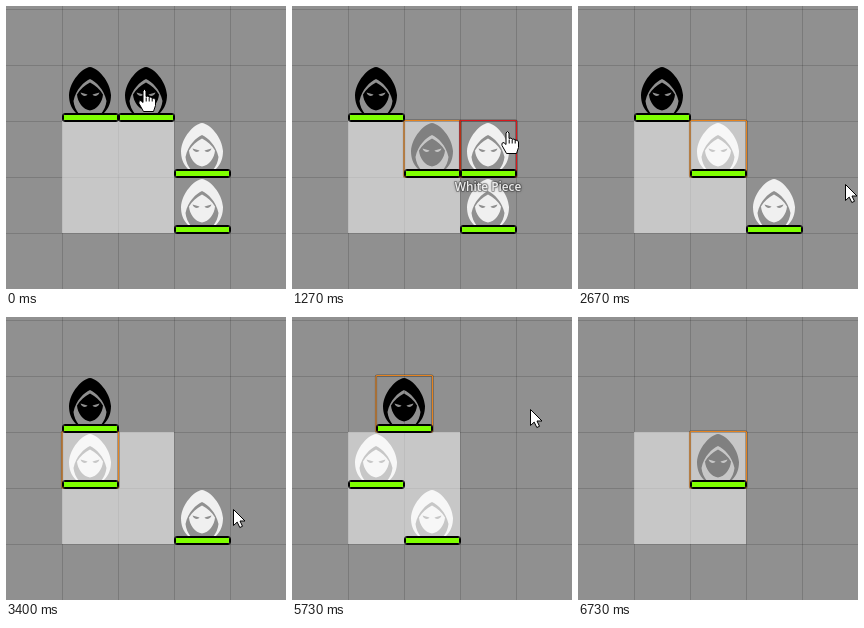
Animation of 280x283 px, one loop 7540 ms. Source, as an HTML page with a canvas:

```html
<!DOCTYPE html>
<html lang="en">
<head>
<meta charset="utf-8">
<title>Board pieces</title>
<style>
  html, body { margin: 0; width: 100%; height: 100%; overflow: hidden; background: #909090; }
  canvas { display: block; }
</style>
</head>
<body>
<canvas id="stage" width="280" height="283"></canvas>
<script>
const ctx = document.getElementById('stage').getContext('2d');
const LOOP = 7540, TICKS_PER_MS = 15 / 1000;
const CELL = 56, TOP = 3;
const SLIDE = 4;   // ticks a piece needs for one cell
const TRAVEL = 5;  // ticks the pointer needs to or from a piece

const hood = new Path2D(
  'M28 2C20 3 8 16 7 30C7 37 9 43 14 48H42C47 43 49 37 49 30C48 16 36 3 28 2Z' +
  'M28 14C22 17 14 24 11.5 36C12 41 14 45 17 49H39C42 45 44 41 44.5 36C42 24 34 17 28 14Z');
const face = new Path2D(
  'M28 17.5C23 20 18 24 15 29.5C15.5 37 21 44.5 28 45.5C35 44.5 40.5 37 41 29.5C38 24 33 20 28 17.5Z' +
  'M18.5 27.5L25.5 29.5C24.5 31.8 19.5 31.5 18.5 27.5ZM37.5 27.5L30.5 29.5C31.5 31.8 36.5 31.5 37.5 27.5Z');
const arrow = new Path2D('M0 0V16L3.7 12.6L6.3 18L9 16.8L6.5 11.5H11.5Z');
const hand = new Path2D(
  'M-1.5 1.5Q0 -1.5 1.5 1.5V7Q4 5.5 4.8 7.8Q7 6.7 7.8 8.7Q10.5 8 11 10.5V16' +
  'L9 22H-1L-5.5 14Q-6 10.5 -3.5 11.2L-1.5 13Z');

// Each turn: the pointer reaches a piece, clicks it, leaves, and the piece takes its steps.
const turns = [
  { color: 'Black', col: 2, row: 1, hover: 1, click: 4, leave: 8, grip: [138, 83], away: [258, 40],
    steps: [{ at: 8, dy: 1 }], lost: 33 },
  { color: 'White', col: 3, row: 2, hover: 19, click: 25, leave: 27, grip: [215, 125], away: [267, 178],
    steps: [{ at: 27, dx: -1 }, { at: 46, dx: -1 }], lost: 98 },
  { color: 'White', col: 3, row: 3, hover: 53, click: 58, leave: 60, grip: [205, 200], away: [275, 129],
    steps: [{ at: 60, dx: -1 }], lost: 98 },
  { color: 'Black', col: 1, row: 1, hover: 75, click: 81, leave: 82, grip: [88, 84], away: [255, 93],
    steps: [{ at: 84, dx: 1 }, { at: 92, dy: 1 }], lost: Infinity }
];
const exit = { hover: 97, click: Infinity, leave: Infinity, grip: [240, 290] };
const nextOf = i => turns[i + 1] || exit;

const ramp = (t, a, b) => Math.min(1, Math.max(0, (t - a) / (b - a)));
const smooth = u => u * u * (3 - 2 * u);
const glide = ([x0, y0], [x1, y1], u) => [x0 + (x1 - x0) * smooth(u), y0 + (y1 - y0) * smooth(u)];

function pieceAt(turn, i, t) {
  let { col, row } = turn;
  for (const { at, dx = 0, dy = 0 } of turn.steps) {
    const u = ramp(t, at, at + SLIDE);
    col += dx * u;
    row += dy * u;
  }
  return {
    x: col * CELL, y: TOP + row * CELL,
    name: turn.color + ' Piece',
    fill: turn.color === 'White' ? '#f0f0f0' : '#000',
    hovered: t >= turn.hover && t < Math.min(turn.leave, turn.steps[0].at),
    selected: t >= turn.click && t < nextOf(i).click
  };
}

function pointerAt(t) {
  const i = turns.findLastIndex((_, k) => k === 0 || t >= turns[k].hover);
  const { grip, away, leave } = turns[i], next = nextOf(i);
  const back = next.hover - TRAVEL;
  return t < back
    ? glide(grip, away, ramp(t, leave, leave + TRAVEL))
    : glide(away, next.grip, ramp(t, back, next.hover));
}

function at(x, y, draw) {
  ctx.save();
  ctx.translate(x, y);
  draw();
  ctx.restore();
}

function drawIcon(p) {
  at(p.x, p.y, () => {
    ctx.fillStyle = p.fill;
    ctx.fill(hood, 'evenodd');
    ctx.fill(face, 'evenodd');
  });
}

function line(color, width, trace) {
  ctx.beginPath();
  trace();
  ctx.strokeStyle = color;
  ctx.lineWidth = width;
  ctx.stroke();
}

function drawBorder(p) {
  if (!p.selected && !p.hovered) return;
  const outline = () => ctx.roundRect(p.x, p.y - 0.5, 56.5, 56.5, 1);
  line('rgba(0,0,0,.4)', 2.2, outline);
  line(p.selected ? '#e58420' : '#d8181c', 1.1, outline);
}

function drawBar(p) {
  const x = p.x + 0.5, y = p.y + 48.5;
  line('#000', 1, () => ctx.roundRect(x, y, 56, 8, 2.5));
  line('#000', 1, () => ctx.roundRect(x + 1, y + 1, 54, 6, 1.5));
  ctx.fillStyle = '#7fff00';
  ctx.fillRect(x + 1.5, y + 1.5, 53, 5);
}

function drawLabel(p) {
  const x = p.x + 28, y = p.y + 70;
  ctx.save();
  ctx.font = '600 11.8px "Open Sans", sans-serif';
  ctx.textAlign = 'center';
  ctx.lineJoin = 'round';
  ctx.lineWidth = 2;
  ctx.strokeStyle = 'rgba(60,60,60,.4)';
  ctx.strokeText(p.name, x, y);
  ctx.shadowColor = 'rgba(0,0,0,.6)';
  ctx.shadowBlur = 3;
  ctx.fillStyle = '#ececec';
  ctx.fillText(p.name, x, y);
  ctx.restore();
}

function drawPointer(t, isHand) {
  const [x, y] = pointerAt(t).map(Math.round);
  at(x + 0.5, y + 0.5, () => {
    const shape = isHand ? hand : arrow;
    ctx.fillStyle = '#fff';
    ctx.fill(shape);
    ctx.strokeStyle = '#000';
    ctx.lineWidth = 1;
    ctx.stroke(shape);
    if (isHand) line('#000', 1, () => {
      for (let k = 0; k < 3; k++) {
        ctx.moveTo(1.7 + 3 * k, 8);
        ctx.lineTo(1.7 + 3 * k, 12);
      }
    });
  });
}

function drawGrid() {
  ctx.fillStyle = '#909090';
  ctx.fillRect(0, 0, 280, 283);
  ctx.fillStyle = 'rgba(0,0,0,.15)';
  for (let i = 0; i < 5; i++) {
    if (i) ctx.fillRect(i * CELL, 0, 1, 283);
    ctx.fillRect(0, TOP + i * CELL, 280, 1);
  }
}

function draw(t) {
  const pieces = turns.map((turn, i) => pieceAt(turn, i, t)).filter((_, i) => t < turns[i].lost);
  drawGrid();
  pieces.forEach(drawIcon);
  // The pale zone veils the pieces, but not their bars and borders.
  ctx.fillStyle = 'rgba(255,255,255,.5)';
  ctx.fillRect(CELL, TOP + 2 * CELL, 2 * CELL, 2 * CELL);
  pieces.forEach(drawBorder);
  pieces.forEach(drawBar);
  const hovered = pieces.find(p => p.hovered);
  if (hovered) drawLabel(hovered);
  drawPointer(t, hovered || t < turns[0].leave);
}

const start = performance.now();
function frame() {
  const ms = (performance.now() - start) % LOOP;
  draw(Math.floor((ms + 5) * TICKS_PER_MS));
  requestAnimationFrame(frame);
}
frame();
</script>
</body>
</html>
```
